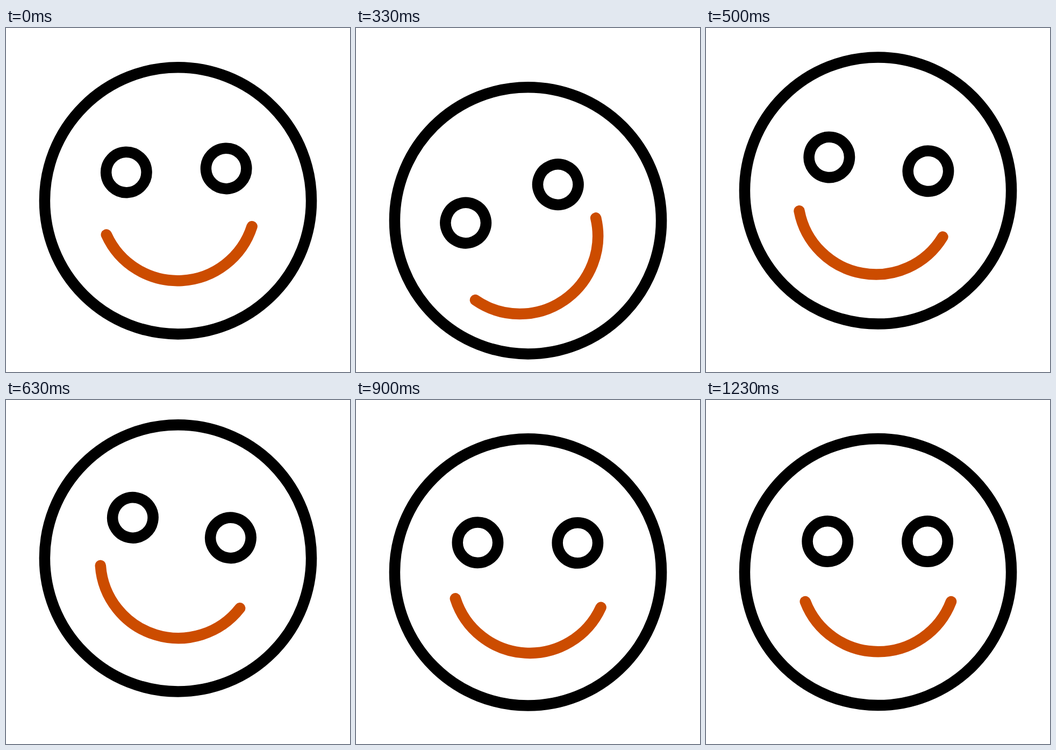
These frames come from a looping animation (640x640 px, 1670 ms). An HTML page:

```html
<!DOCTYPE html>
<html>
<head>
<meta charset="utf-8">
<title>Nodding smiley</title>
<style>
  html, body { margin: 0; height: 100%; overflow: hidden; background: #fff; }
  svg { display: block; width: 100%; height: 100%; }
</style>
</head>
<body>
<svg viewBox="0 0 640 640" fill="none" stroke="#000" stroke-width="20.5">
  <g id="head">
    <circle cx="320" cy="320" r="248.1"/>
    <g id="face">
      <ellipse class="eye" cx="226.2" cy="263" rx="37.7" ry="37.7"/>
      <ellipse class="eye" cx="412.1" cy="263" rx="37.7" ry="37.7"/>
      <path id="mouth" d="M184.7 375A145.3 145.3 0 0 0 456 375" stroke="#cc4c00" stroke-linecap="round"/>
    </g>
  </g>
</svg>
<script>
const LOOP = 1670;
const EYE = 37.7;
const [head, face, mouth] = ['head', 'face', 'mouth'].map(id => document.getElementById(id));
const eyes = document.querySelectorAll('.eye');

const ease = u => u * u * (3 - 2 * u);

// Swings from rest through each peak and back to rest.
// The first peak falls at `first`, the second at 15, the others every `beat`.
function swing(time, first, beat, ...peaks) {
  let from = 0, value = 0;
  for (const [i, peak] of [...peaks, 0].entries()) {
    const to = i ? 15 + beat * (i - 1) : first;
    if (time < to) return value + (peak - value) * ease((time - from) / (to - from));
    from = to;
    value = peak;
  }
  return 0;
}

function draw(now) {
  // The motion advances 30 times per second; time counts in 1/24 s
  const step = Math.floor((Math.floor(now % LOOP / 10) * 10 + 5) * 0.03);
  const time = 1 + step * 0.8;

  const bounce = swing(time, 9, 4, 38.3, -37, 15.5);
  const x = swing(time, 10.2, 5, -7.65, -4.6, 1.25, -1);
  const y = swing(time, 10.2, 5, 21.7, -1.3, 2.8, 1.5);
  const tilt = swing(time, 6.4, 5, -33, 14.5, -5.25, 5);
  const smirk = swing(time, 6.4, 5, -16.4, 5.2, 6.4, 0.5);
  const open = ease(Math.min(1, Math.abs(time - 6) / 3));

  head.setAttribute('transform', `translate(0 ${bounce})`);
  face.setAttribute('transform', `translate(${x} ${y}) rotate(${tilt} 320 320)`);
  mouth.setAttribute('transform', `rotate(${smirk} 320 375)`);
  eyes.forEach(eye => eye.setAttribute('ry', Math.max(0.1, EYE * open)));
}

const start = performance.now();
function tick() {
  draw(performance.now() - start);
  requestAnimationFrame(tick);
}
tick();
</script>
</body>
</html>
```
